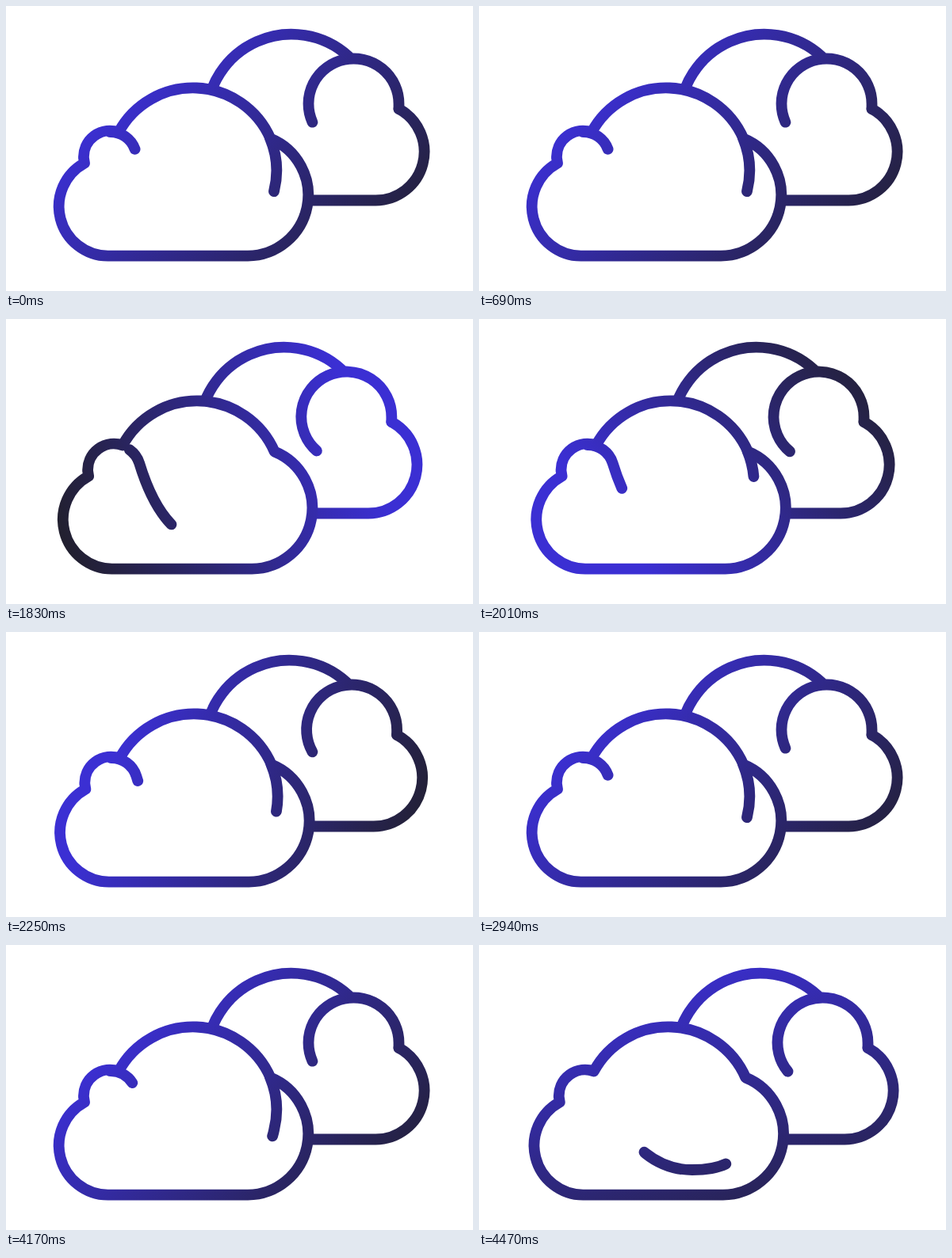
Recreate the animation shown at these times as an HTML page. Size 589 by 360 pixels, loop 4500 ms.

```html
<!DOCTYPE html>
<html lang="en">
<head>
<meta charset="utf-8">
<title>Clouds</title>
<style>
  html, body { margin: 0; width: 100%; height: 100%; overflow: hidden; background: #fff; }
  svg { display: block; width: 589px; height: 360px; }
  path { fill: none; stroke: url(#ink); stroke-width: 13.8; stroke-linecap: round; stroke-linejoin: round; }
  #front .body { fill: #fff; }
</style>
</head>
<body>
<svg viewBox="0 0 589 360">
  <defs>
    <linearGradient id="ink" gradientUnits="userSpaceOnUse">
      <stop offset="0" stop-color="#222030"/>
      <stop offset="1" stop-color="#3b2fd3"/>
    </linearGradient>
  </defs>
  <g id="back">
    <path d="M253 143.5A107 107 0 0 1 432 63.5"/>
    <path d="M495.5 130A61.5 61.5 0 0 1 466 245.5H330"/>
    <path id="curl"/>
  </g>
  <g id="front">
    <path class="body" d="M128.5 315.7A62.5 62.5 0 0 1 99 198.5L98 192A33 33 0 0 1 142 159.5
      A106.5 106.5 0 0 1 333.5 167.5A77 77 0 0 1 305 315.7Z"/>
    <path id="swirl" pathLength="1" stroke-dasharray=".3 .7" d="M131 159A33 33 0 0 1 163 182
      C170 205 184 242 207 263C222 275 242 284 266 284C284 284 300 282 313 274
      C325 266 335 250 338 234A106.5 106.5 0 0 0 333 167"/>
  </g>
</svg>
<script>
const LOOP = 4500, STEP = 30, CYCLE = 92.5;
const $ = id => document.getElementById(id);
const set = (id, attrs) => {
  for (const name in attrs) $(id).setAttribute(name, attrs[name]);
};
const clamp = x => Math.min(1, Math.max(0, x));

// Cubic-bezier easing with handles (x1, 0) and (x2, 1)
const bezier = (x1, x2) => x => {
  x = clamp(x);
  let lo = 0, hi = 1;
  for (let i = 0; i < 30; i++) {
    const s = (lo + hi) / 2, r = 1 - s;
    if (3 * r * r * s * x1 + 3 * r * s * s * x2 + s ** 3 < x) lo = s; else hi = s;
  }
  return lo * lo * (3 - 2 * lo);
};
const sweep = bezier(.6, .06), settle = bezier(.4, .2);
const cubic = x => (x = clamp(x)) < .5 ? 4 * x ** 3 : 1 - 4 * (1 - x) ** 3;
const drift = c => 10 * (cubic((c - 46.5) / 20) - settle((c - 66.5) / 17.5));

function curlPath(degrees) {
  const a = degrees * Math.PI / 180;
  const x = 438.5 + 57 * Math.cos(a), y = 123.5 + 57 * Math.sin(a);
  return `M495.5 130L495.5 123.5A57 57 0 1 0 ${x} ${y}`;
}

function draw(ms) {
  const c = Math.floor(ms % LOOP / STEP) % CYCLE;

  const shift = drift(c);
  set('back', { transform: `translate(${-shift} 0)` });
  set('front', { transform: `translate(${.56 * shift} 0)` });
  set('curl', { d: curlPath(156 - 2.65 * drift(c + .6)) });

  const head = .112 - sweep((c - 40.85) / 43.4);
  set('swirl', { 'stroke-dashoffset': .3 - head });

  const angle = (138 - 360 * sweep((c - 47.1) / 41.5)) * Math.PI / 180;
  const dx = Math.cos(angle), dy = -Math.sin(angle);
  set('ink', {
    x1: 297 - 250 * dx, y1: 176 - 250 * dy,
    x2: 297 + 160 * dx, y2: 176 + 160 * dy
  });
}

const start = performance.now();
(function tick() {
  draw(performance.now() - start);
  requestAnimationFrame(tick);
})();
</script>
</body>
</html>
```
